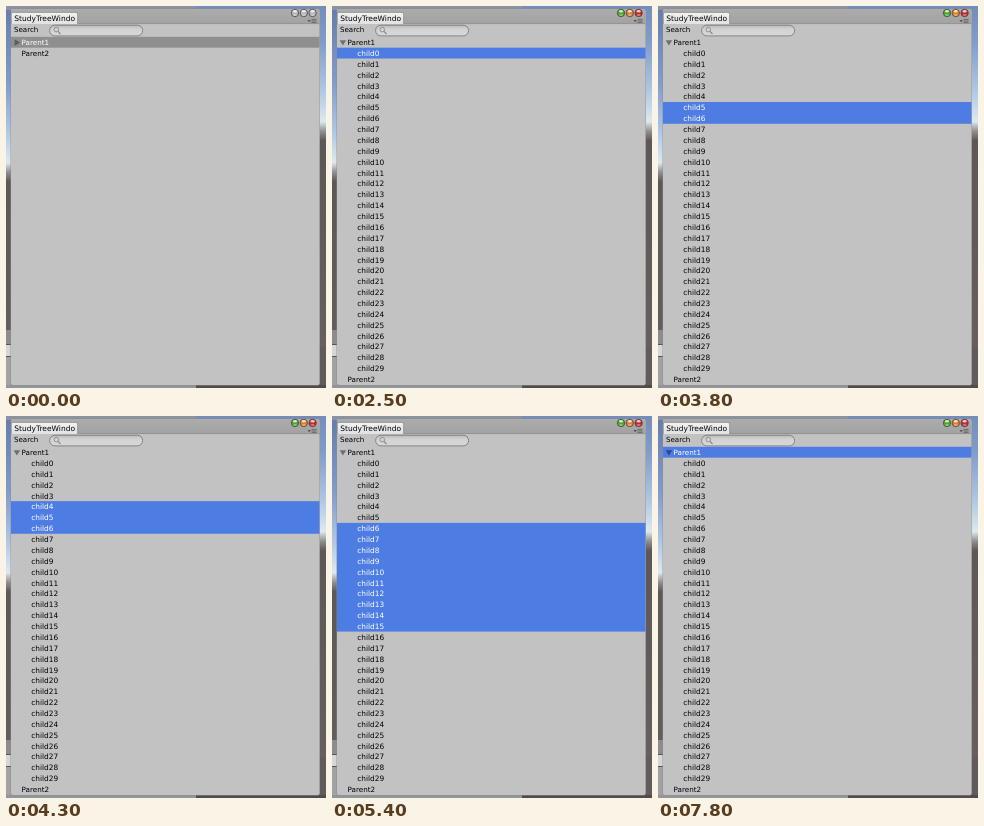
Write an HTML page that moves like this. It is 320x382 px and loops after 8000 ms.

```html
<!DOCTYPE html>
<html lang="en">
<head>
<meta charset="utf-8">
<title>Tree window</title>
<style>
html, body { margin: 0; width: 100%; height: 100%; overflow: hidden; background: #625b5b; }
svg { display: block; width: 320px; height: 382px; }
text { font: 7.2px "DejaVu Sans", sans-serif; fill: #000; }
</style>
</head>
<body>
<svg id="stage" viewBox="0 0 320 382">
  <defs>
    <linearGradient id="sky" x1="0" y1="0" x2="0" y2="1">
      <stop offset="0" stop-color="#647cac"/>
      <stop offset=".2" stop-color="#829bc8"/>
      <stop offset=".33" stop-color="#b0c8e4"/>
      <stop offset=".41" stop-color="#dce9ee"/>
      <stop offset=".435" stop-color="#91908f"/>
      <stop offset=".46" stop-color="#5d5755"/>
      <stop offset="1" stop-color="#665f5e"/>
    </linearGradient>
    <linearGradient id="bar" x1="0" y1="0" x2="0" y2="1">
      <stop offset="0" stop-color="#acacac"/>
      <stop offset="1" stop-color="#a2a2a2"/>
    </linearGradient>
    <linearGradient id="tab" x1="0" y1="0" x2="0" y2="1">
      <stop offset="0" stop-color="#f2f2f2"/>
      <stop offset="1" stop-color="#e2e2e2"/>
    </linearGradient>
    <linearGradient id="field" x1="0" y1="0" x2="0" y2="1">
      <stop offset="0" stop-color="#b8b8b8"/>
      <stop offset=".35" stop-color="#d2d2d2"/>
      <stop offset="1" stop-color="#d8d8d8"/>
    </linearGradient>
  </defs>

  <rect width="160" height="382" fill="url(#sky)"/>
  <rect x="160" y="-42" width="160" height="424" fill="#625b5b"/>
  <rect x="160" y="-41" width="160" height="382" fill="url(#sky)"/>
  <rect width="190" height="4" fill="#8b93a2"/>
  <rect y="324" width="5" height="14" fill="#8c8c8c"/>
  <rect y="338" width="5" height="13" fill="#d6d6d6"/>
  <rect y="338" width="5" height="1" fill="#555"/>
  <rect y="350" width="5" height="1" fill="#555"/>
  <rect y="351" width="5" height="31" fill="#a2a2a2"/>
  <rect y="379" width="190" height="3" fill="#92959a"/>
  <rect x="190" y="379" width="130" height="3" fill="#514b4b"/>

  <rect x="4.6" y="2.600" width="309.200" height="376.800" rx="2" fill="#8c8c8c"/>
  <rect x="5" y="3" width="308.500" height="376" rx="2" fill="#c2c2c2"/>
  <path d="M5 17.800V5q0-2 2-2H311.500q2 0 2 2V17.800z" fill="url(#bar)"/>
  <path d="M72 17.600H313.500" stroke="#8b8b8b" stroke-width=".7"/>
  <path d="M5.300 18V8q0-1.600 1.600-1.600H70q1.600 0 1.600 1.600V18" fill="url(#tab)" stroke="#7d7d7d" stroke-width=".6"/>
  <text x="8.300" y="15.200" style="font-size:7.500px">StudyTreeWindo</text>
  <g id="lights"></g>
  <path d="M301.500 14h3.400l-1.700 2.200z" fill="#555"/>
  <path d="M305.500 13.400h5M305.500 15h5M305.500 16.600h5" stroke="#555" stroke-width=".7"/>

  <text x="8" y="26.200" style="font-size:7.100px">Search</text>
  <rect x="43.600" y="19.200" width="93" height="10.700" rx="5.300" fill="url(#field)" stroke="#7c7c7c" stroke-width=".9"/>
  <circle cx="50.300" cy="23.600" r="2.300" fill="none" stroke="#858585" stroke-width=".8"/>
  <path d="M52 25.400l2.500 2.600" stroke="#858585" stroke-width="1.100"/>

  <g id="rows"></g>
  <path id="arrow"/>
</svg>
<script>
const NS = "http://www.w3.org/2000/svg";
const LOOP = 8000, TOP = 30.8, PITCH = 10.87, KIDS = 30;
const byId = id => document.getElementById(id);

function set(el, attrs) {
  for (const key in attrs) el.setAttribute(key, attrs[key]);
}
function add(parent, tag, attrs) {
  const el = document.createElementNS(NS, tag);
  set(el, attrs);
  parent.appendChild(el);
  return el;
}

const bar = add(byId("rows"), "rect", { x: 5, width: 308.5 });

function makeRow(label, x, size) {
  const el = add(byId("rows"), "text", { x, style: `font-size:${size}px` });
  el.textContent = label;
  return el;
}
const parent1 = makeRow("Parent1", 15.5, 7.2);
const kids = Array.from({ length: KIDS }, (_, i) => makeRow("child" + i, 25.2, 7.4));
const parent2 = makeRow("Parent2", 15.5, 7.2);

const lights = [[289, "#4aa72a"], [297.8, "#dd7d26"], [306.6, "#c9272b"]].map(([cx, color]) => {
  const dot = add(byId("lights"), "circle", { cx, cy: 7, r: 3.7, stroke: "#4a4a4a", "stroke-width": .8 });
  add(byId("lights"), "ellipse", { cx, cy: 5.3, rx: 2, ry: 1.2, fill: "#fff", opacity: .75 });
  add(byId("lights"), "ellipse", { cx, cy: 9, rx: 2, ry: 1.1, fill: "#fff", opacity: .35 });
  return { dot, color };
});

// [time, first row, last row]; row 0 is Parent1
const steps = [
  [0, 0, 0], [1300, 1, 1], [1900, 0, 0], [2300, 1, 1],
  [2700, 2, 2], [2900, 3, 3], [3000, 4, 4], [3100, 5, 5], [3200, 6, 6], [3300, 7, 7],
  [3600, 6, 7], [4200, 5, 7], [4600, 4, 7]
];
const FOCUS = 900, OPEN = 2100, SWEEP = 5100, LAST = 22, RESET = 7600;

function selection(t) {
  if (t >= RESET) return [0, 0];
  if (t >= SWEEP) return [7, Math.min(LAST, 7 + 3 * Math.floor((t - SWEEP) / 100))];
  return steps.filter(s => s[0] <= t).pop().slice(1);
}

function draw(t) {
  const focused = t >= FOCUS, open = t >= OPEN;
  const [first, last] = selection(t);
  const rows = open ? [parent1, ...kids, parent2] : [parent1, parent2];

  kids.forEach(k => set(k, { visibility: open ? "visible" : "hidden" }));
  rows.forEach((el, i) => {
    el.setAttribute("y", TOP + 8.3 + i * PITCH);
    el.style.fill = i >= first && i <= last ? "#fff" : "#000";
  });
  set(bar, {
    y: TOP + first * PITCH,
    height: (last - first + 1) * PITCH,
    fill: focused ? "#4d7de3" : "#8f8f8f"
  });
  set(byId("arrow"), {
    d: open ? "M7.600 34.200h6.600l-3.300 5.400z" : "M8.600 33.200v6.600l5.400-3.300z",
    fill: first === 0 ? (focused ? "#27488f" : "#5c5c5c") : "#707070"
  });
  lights.forEach(l => set(l.dot, { fill: focused ? l.color : "#b4b4b4" }));
}

function tick() {
  draw(performance.now() % LOOP);
  requestAnimationFrame(tick);
}
tick();
</script>
</body>
</html>
```
